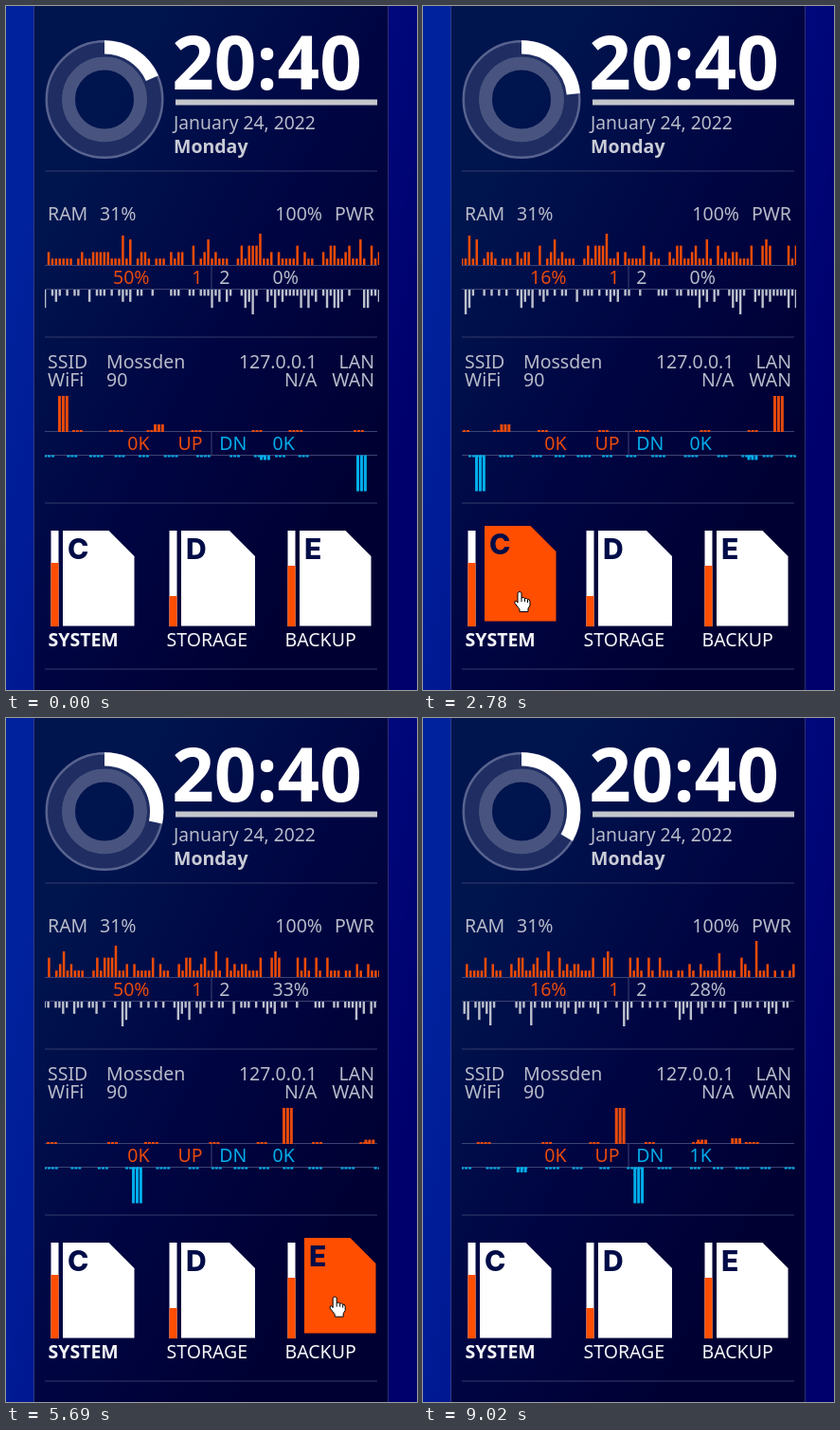
Write an HTML page with a canvas that moves like this. It is 434 px wide and 721 px high and loops after 9050 ms.

```html
<!DOCTYPE html>
<html lang="en">
<head>
<meta charset="utf-8">
<title>Desktop sidebar</title>
<style>
html, body { margin: 0; width: 100%; height: 100%; overflow: hidden; background: #00083c; }
canvas { display: block; width: 434px; height: 721px; }
</style>
</head>
<body>
<canvas id="stage" width="434" height="721"></canvas>
<script>
const W = 434, H = 721, LOOP = 9050;
const SPEED = 26.8;                       // graph scroll, px per second
const TRAVEL = SPEED * LOOP / 1000;
const PITCH = 3.92;                       // distance between graph bars
const LEFT = 41, RIGHT = 394;
const ORANGE = '#ff4e00', LABEL_ORANGE = '#e84a0c', CYAN = '#00aeea', GREY = '#b7bbc9';
const SANS = '"Noto Sans", "Open Sans", sans-serif';
const ctx = document.getElementById('stage').getContext('2d');

function rect(x, y, w, h, color) {
  ctx.fillStyle = color;
  ctx.fillRect(x, y, w, h);
}

function text(str, x, y, color = GREY, align = 'left', font = '19.5px ' + SANS) {
  ctx.font = font;
  ctx.textAlign = align;
  ctx.fillStyle = color;
  ctx.fillText(str, x, y);
}

function rng(seed) {
  return () => {
    seed = (seed * 1664525 + 1013904223) % 4294967296;
    return seed / 4294967296;
  };
}

// Processor load: stepped random heights with a few tall peaks [x, height].
function loadBars(from, to, seed, density, unit, peaks) {
  const rand = rng(seed), bars = [];
  for (let x = from; x < to; x += PITCH) {
    const filled = rand() < density, level = 1 + Math.floor(3 * rand() ** 2.2);
    const peak = peaks.find(p => Math.abs(p[0] - x) <= PITCH / 2);
    if (peak) bars.push([x, peak[1]]);
    else if (filled) bars.push([x, level * unit]);
  }
  return bars;
}

// Network traffic: short runs of low ticks, plus bursts [x, height] of three bars.
function trafficBars(from, to, seed, gap, bursts) {
  const rand = rng(seed), bars = [];
  const run = (x, n, h) => {
    for (let i = 0; i < n; i++) bars.push([x + i * PITCH, h]);
  };
  for (let x = from; x < to; x += gap * (0.6 + 0.8 * rand())) {
    const n = 3 + Math.floor(2 * rand());
    run(x, n, 2);
    x += n * PITCH;
  }
  for (const [x, h] of bursts) run(x, 3, h);
  return bars;
}

const cpu1 = loadBars(43.8, RIGHT + TRAVEL, 17, 0.82, 6.8,
  [[122, 31], [132, 27], [212, 27], [268, 33], [372, 27], [435, 27], [555, 25], [593, 38]]);
const cpu2 = loadBars(43.8 - 62 * PITCH, RIGHT, 5, 0.56, 6.4,
  [[-173, 25], [-129, 25], [-32, 26], [261, 26]]);
const up = trafficBars(70, RIGHT + TRAVEL, 9, 40,
  [[55, 38], [156, 8], [444.5, 38], [531, 4.5], [567, 6]]);
const down = trafficBars(LEFT - TRAVEL, 330, 3, 14,
  [[-143, 5.5], [-19.5, 38], [268, 5], [370, 38]]);

function drawBars(bars, shift, base, dir, width, color) {
  ctx.fillStyle = color;
  for (const [x, h] of bars) {
    const a = Math.max(LEFT, x + shift), b = Math.min(RIGHT, x + shift + width);
    if (b > a) ctx.fillRect(a, base, b - a, h * dir);
  }
}

// [second, cpu 1, cpu 2, upload, download]
const readings = [
  [0, '50%', '0%', '0K', '0K'],
  [1, '28%', '33%', '0K', '0K'],
  [3, '16%', '0%', '0K', '0K'],
  [4, '16%', '28%', '6K', '702K'],
  [6, '50%', '33%', '0K', '0K'],
  [8, '20%', '0%', '1K', '1K'],
  [9, '16%', '28%', '0K', '1K']
];
const secondAt = t => Math.floor(t / 1000 + 0.65);

// [ms, x, y] of the pointer tip
const path = [
  [1550, 80, 726], [2250, 102, 617], [2880, 102, 617], [3600, 217, 605], [4680, 218, 606],
  [5400, 347, 609], [7370, 350, 620], [7710, 397, 711], [7780, 400, 726]
];

function pointerAt(t) {
  const i = path.findIndex(k => k[0] > t);
  if (i < 1) return null;
  const [t0, x0, y0] = path[i - 1], [t1, x1, y1] = path[i];
  const u = (t - t0) / (t1 - t0), e = u * u * (3 - 2 * u);
  return { x: x0 + (x1 - x0) * e, y: y0 + (y1 - y0) * e };
}

const drives = [
  { letter: 'C', name: 'SYSTEM', x: 0, w: 75.5, top: 587, weight: 'bold ' },
  { letter: 'D', name: 'STORAGE', x: 125, w: 78, top: 622, weight: '' },
  { letter: 'E', name: 'BACKUP', x: 250, w: 75.5, top: 590, weight: '' }
];

const isOver = (d, p) => p && p.x > d.x + 47 && p.x < d.x + 139 && p.y > 548 && p.y < 654;

function gradient(x0, y0, x1, y1, colors) {
  const g = ctx.createLinearGradient(x0, y0, x1, y1);
  colors.forEach((c, i) => g.addColorStop(i / (colors.length - 1), c));
  return g;
}

function background() {
  rect(0, 0, W, H, gradient(0, 300, W, 400, ['#00229c', '#00108a', '#00006c']));
  rect(30, 0, 373, H, gradient(30, 260, 403, 460, ['#00144e', '#000542', '#000032']));
  rect(29, 0, 1, H, '#2c3c88');
  rect(403, 0, 1, H, '#2c3070');
  for (let y = 174; y < H; y += 175) rect(41, y - 0.5, 351, 1, '#343c6c');
}

function ring(inner, outer, color, from = 0, to = Math.PI * 2) {
  ctx.strokeStyle = color;
  ctx.lineWidth = outer - inner;
  ctx.beginPath();
  ctx.arc(104, 98.5, (inner + outer) / 2, from, to);
  ctx.stroke();
}

function clock(t) {
  const start = -Math.PI / 2;
  ring(45, 62, '#1f2d62');
  ring(60, 62.5, '#59638f');
  ring(31, 45, '#48547f');
  ring(48, 62.3, '#ffffff', start, start + (11 + secondAt(t)) * Math.PI / 30);
  text('20:40', 275.5, 88, '#ffffff', 'center', 'bold 78px ' + SANS);
  rect(179, 98.5, 213, 6, '#c4c6cc');
  text('January 24, 2022', 177, 130, GREY, 'left', '19.3px ' + SANS);
  text('Monday', 177, 155, '#c9ccd6', 'left', 'bold 19.5px ' + SANS);
}

function graphFrame(y) {
  rect(41, y, 351, 1, '#3c4474');
  rect(41, y + 25, 351, 1, '#3c4474');
  rect(216.5, y, 1, 25, '#3c4474');
}

// Captions between the two halves of a graph.
function captions(y, left, leftName, rightName, right, rightColor) {
  text(left, 151.5, y, LABEL_ORANGE, 'right');
  text(leftName, 207.5, y, LABEL_ORANGE, 'right');
  text(rightName, 225.3, y, rightColor);
  text(right, 281.5, y, rightColor);
}

// Four columns: two set left, two set right.
function infoRow(y, a, b, c, d) {
  text(a, 44, y);
  text(b, 106, y);
  text(c, 328.5, y, GREY, 'right');
  text(d, 389, y, GREY, 'right');
}

function meters(t) {
  const shift = SPEED * t / 1000;
  const [, load1, load2, sent, got] = readings.filter(r => r[0] <= secondAt(t)).pop();

  text('RAM', 44, 226);
  text('31%', 99, 226);
  text('100%', 334, 226, GREY, 'right');
  text('PWR', 389, 226, GREY, 'right');
  graphFrame(273);
  drawBars(cpu1, -shift, 273, -1, 2.5, '#f04c06');
  drawBars(cpu2, shift, 299, 1, 2.4, '#bcc0cc');
  captions(293, load1, '1', '2', load2, GREY);

  infoRow(382, 'SSID', 'Mossden', '127.0.0.1', 'LAN');
  infoRow(401, 'WiFi', '90', 'N/A', 'WAN');
  graphFrame(448);
  drawBars(up, -shift, 449, -1, 3, LABEL_ORANGE);
  drawBars(down, shift, 473.5, 1, 3, CYAN);
  captions(468, sent, 'UP', 'DN', got, CYAN);
}

function drive(d, hover) {
  rect(d.x + 47.5, 553, 8, 101, '#ffffff');
  rect(d.x + 47.5, d.top, 8, 654 - d.top, ORANGE);
  const lift = hover ? 5 : 0;
  const x = d.x + 60 + lift, y = 553 - lift;
  ctx.fillStyle = hover ? ORANGE : '#ffffff';
  ctx.beginPath();
  ctx.moveTo(x, y);
  ctx.lineTo(x + d.w - 27, y);
  ctx.lineTo(x + d.w, y + 27);
  ctx.lineTo(x + d.w, y + 100.5);
  ctx.lineTo(x, y + 100.5);
  ctx.fill();
  text(d.letter, x + 5, y + 30, '#000d48', 'left', '800 30px Inter, "Liberation Sans", sans-serif');
  text(d.name, d.x + 44.5, 675, '#f4f5f9', 'left', d.weight + '19.5px ' + SANS);
}

const hand = new Path2D('M-2 12V1.5Q0-1 2 1.5V7Q4 5.5 5.5 7.5Q7.5 6.5 8.5 8.5Q11 8 11 11V15L9 18V21.5H0V19L-5 12.5Q-5.5 9.5-3.5 10Z');
const creases = new Path2D('M2 7V11M5.5 7.5V11M8.5 8.5V12');
const arrow = new Path2D('M0 0V16.5L4 12.8L6.6 19L9 18L6.4 12H11.5Z');

function pointer(p, hover) {
  const shape = hover ? hand : arrow;
  ctx.save();
  ctx.translate(p.x, p.y);
  ctx.fillStyle = '#ffffff';
  ctx.strokeStyle = '#000000';
  ctx.lineWidth = 1;
  ctx.fill(shape);
  ctx.stroke(shape);
  if (hover) ctx.stroke(creases);
  ctx.restore();
}

function draw() {
  const t = performance.now() % LOOP;
  const p = pointerAt(t);
  const active = drives.find(d => isOver(d, p));
  background();
  clock(t);
  meters(t);
  for (const d of drives) drive(d, d === active);
  if (p) pointer(p, Boolean(active));
  requestAnimationFrame(draw);
}
draw();
</script>
</body>
</html>
```
